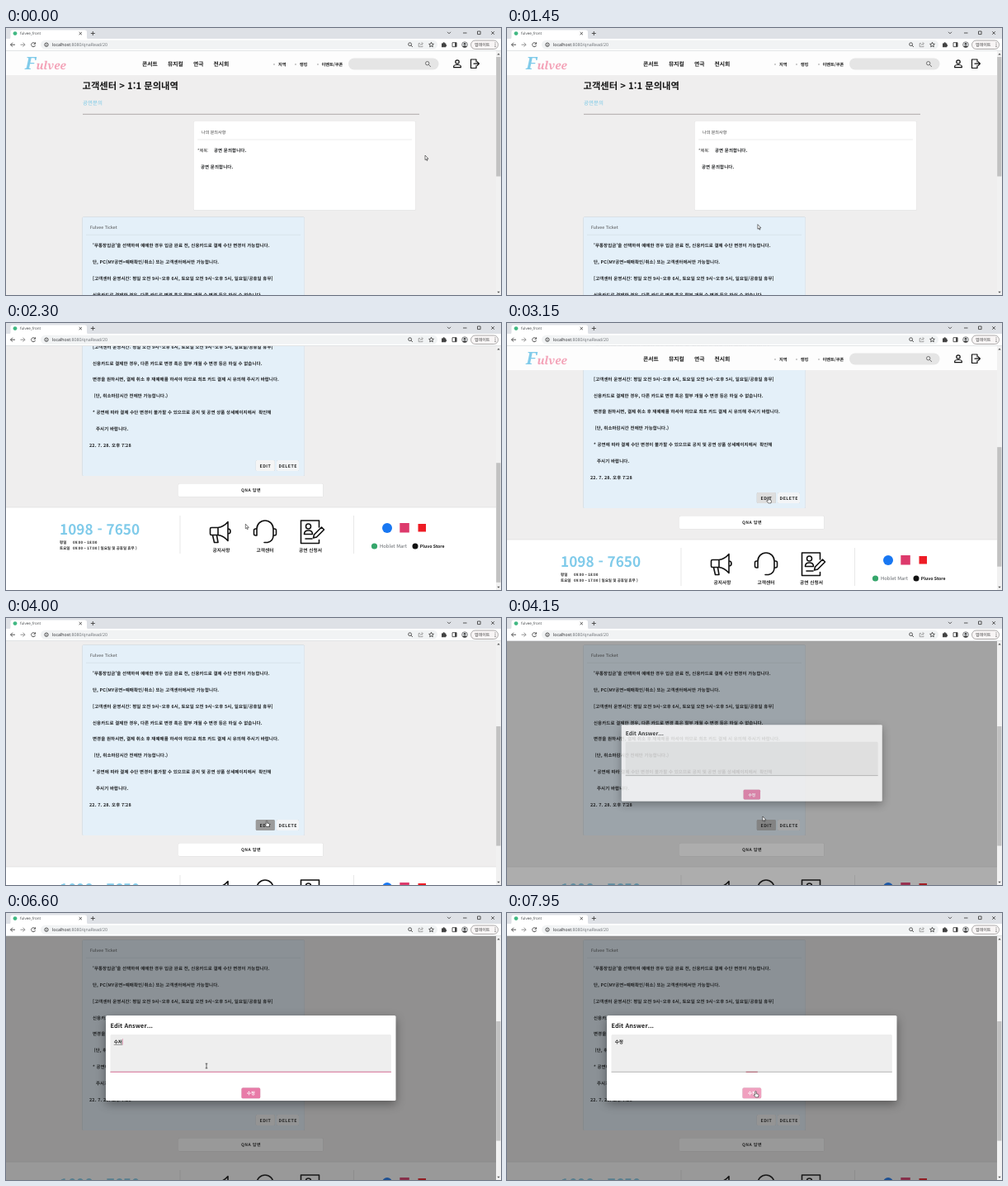
Write an HTML page that moves like this. It is 600 px wide and 323 px high and loops after 8000 ms.

```html
<!DOCTYPE html>
<html lang="ko">
<head>
<meta charset="utf-8">
<title>Q&amp;A</title>
<style>
html, body { margin: 0; width: 100%; height: 100%; overflow: hidden; background: #efeeee; }
svg { display: block; width: 600px; height: 323px; }
text { font-family: "Noto Sans CJK KR", "Noto Sans CJK", sans-serif; white-space: pre; text-rendering: geometricPrecision; }
.ui { font-family: "Open Sans", sans-serif; }
.logo { font: italic 700 13.5px "Noto Serif", serif; }
.b { font-weight: 700; }
.body { font-size: 5.46px; font-weight: 700; letter-spacing: .0179em; fill: #1c1e20; }
.btn { font-weight: 700; letter-spacing: .089em; fill: #222; }
.mid { text-anchor: middle; }
.card { filter: drop-shadow(0 .8px .5px rgba(0,0,0,.25)); }
.pop { filter: drop-shadow(0 4px 6px rgba(0,0,0,.38)); }
.ln { fill: none; stroke: #444; stroke-width: .9; }
.ic { fill: none; stroke: #111; stroke-width: 1.6; stroke-linejoin: round; stroke-linecap: round; }
</style>
</head>
<body>
<svg viewBox="0 0 600 323">
  <defs><clipPath id="view"><path d="M0 27.5H594V323H0z"/></clipPath></defs>
  <rect width="600" height="323" fill="#efeeee"/>

  <g clip-path="url(#view)">
    <g id="page">
      <text class="b" x="92.5" y="74" font-size="11.3" fill="#151515">고객센터 &gt; 1:1 문의내역</text>
      <text x="93" y="93.3" font-size="6.5" fill="#78c8e6">공연문의</text>
      <path d="M93 104.3H501" stroke="#aaa3a3" stroke-width=".9"/>

      <rect class="card" x="227.3" y="113" width="269.3" height="107.5" rx="1.5" fill="#fff"/>
      <text x="237" y="128" font-size="5.05" fill="#333">나의 문의사항</text>
      <path d="M232 135H492" stroke="#e6e6e6" stroke-width=".7"/>
      <text x="232" y="150" font-size="5.2" fill="#222">*제목:</text>
      <text class="body" x="252" y="150">공연 문의합니다.</text>
      <text class="body" x="236" y="170">공연 문의합니다.</text>

      <rect class="card" x="92.5" y="228.5" width="269.3" height="230.5" rx="1.5" fill="#e4f0f9"/>
      <text x="102" y="243.4" font-size="5.1" letter-spacing=".1" fill="#444">Fulvee Ticket</text>
      <path d="M97 250.3H357" stroke="#d3dfe7" stroke-width=".7"/>
      <g id="answer"></g>
      <g class="card"><rect id="edit" x="302.8" y="440" width="23" height="13" rx="1.5"/></g>
      <text class="btn mid" x="314.4" y="448.5" font-size="5.2">EDIT</text>
      <rect class="card" x="328" y="440" width="27" height="13" rx="1.5" fill="#f3f5f7"/>
      <text class="btn mid" x="341.7" y="448.5" font-size="5.2">DELETE</text>
      <rect class="card" x="209" y="468.3" width="175.5" height="16" rx="1.5" fill="#fff"/>
      <text class="btn mid" x="297" y="478.3" font-size="5">QNA 답변</text>

      <g transform="translate(0 235)">
        <rect y="262" width="594" height="110" fill="#fff"/>
        <path d="M0 262H594M211 272V318M421.5 272V318" stroke="#dedede" stroke-width=".7"/>
        <text class="b" x="65" y="294.7" font-size="17.2" fill="#80cbea">1098 - 7650</text>
        <g class="b" font-size="4.5" fill="#222">
          <text x="65" y="306">평일</text><text x="81" y="306">09:00 ~ 18:00</text>
          <text x="65" y="312.8">토요일</text><text x="81" y="312.8">09:00 ~ 17:00 ( 일요일 및 공휴일 휴무 )</text>
        </g>
        <g class="ic">
          <path d="M249 286.5h8q7-1 12-7v23q-5-6-12-7h-8q-1.5 0-1.5-1.5v-6q0-1.5 1.5-1.5zM257 286.5v9M250.5 296l2 8.5h4.5l-1.5-8.5M269 288q3 0 3 3t-3 3"/>
          <path d="M304 293v-5a10 10 0 0 1 20 0v5M304 288h-1.5q-2 0-2 2v4q0 2 2 2h1.5zM324 288h1.5q2 0 2 2v4q0 2-2 2h-1.5zM324 296q0 7-7 8.5h-4"/>
          <path d="M379.5 286v-8h-22v27.5h22v-4M363 300h8M361.5 294.5q0-4.5 5-4.5t5 4.5zM372.5 299l1-4 9-9 3 3-9 9z"/>
          <circle cx="366.5" cy="285" r="3"/>
        </g>
        <g class="b mid" font-size="5.7" fill="#222">
          <text x="261" y="316">공지사항</text><text x="314" y="316">고객센터</text><text x="369" y="316">공연 신청서</text>
        </g>
        <circle cx="462" cy="287" r="6" fill="#1877f2"/>
        <rect x="477.3" y="281" width="11.5" height="11.5" fill="#dd3a6c"/>
        <rect x="499.5" y="282" width="9.5" height="9.5" fill="#ee1c25"/>
        <circle cx="446.5" cy="309" r="3.6" fill="#35a66b"/>
        <text x="453" y="311.3" font-size="5.9" fill="#5f6368">Hoblet Mart</text>
        <circle cx="496" cy="309" r="3.5" fill="#111"/>
        <text class="b" x="501.8" y="311" font-size="5.2" fill="#111">Pluvo Store</text>
      </g>
    </g>

    <g id="header">
      <rect class="card" y="27" width="594" height="30" fill="#fdfdfd"/>
      <text class="logo" x="23" y="50" style="font-size:21px" fill="#80cbea">F</text>
      <text class="logo" x="36.5" y="50" fill="#f4a3b8">ulvee</text>
      <g class="b" font-size="6.8" fill="#1a1a1a">
        <text x="165" y="46">콘서트</text><text x="196" y="46">뮤지컬</text><text x="227" y="46">연극</text><text x="251.5" y="46">전시회</text>
      </g>
      <g class="b" font-size="5.2" fill="#222">
        <text x="330" y="45.5">지역</text><text x="356" y="45.5">랭킹</text><text x="382.5" y="45.5">이벤트/쿠폰</text>
      </g>
      <path d="M325 44h.01M351 44h.01M378 44h.01" stroke="#777" stroke-width="1.3" stroke-linecap="round"/>
      <rect x="415" y="36.5" width="109.5" height="14" rx="7" fill="#e5e5e5"/>
      <g class="ln" style="stroke:#666"><circle cx="510.7" cy="42.7" r="2.2"/><path d="M512.3 44.3l2.6 2.7"/></g>
      <g class="ic" style="stroke-width:1.2">
        <circle cx="547" cy="41" r="2.2"/><path d="M542.7 47.7v-1.2q0-2 4.3-2t4.3 2v1.2z"/>
        <path d="M570 41v-3h-6.5v10.5h6.5v-3M567 43.2h6M571.3 41l2.2 2.2-2.2 2.2"/>
      </g>
    </g>

    <rect id="shade" y="27.5" width="594" height="296" fill="#212121"/>
    <g id="dialog">
      <rect class="pop" x="121" y="124" width="351.5" height="103" rx="1.5" fill="#fff"/>
      <text class="b" x="126.5" y="138.5" font-size="7.3" letter-spacing=".1" fill="#222">Edit Answer...</text>
      <path id="field" d="M126.5 192.5V148.5q0-1.5 1.5-1.5H465.3q1.5 0 1.5 1.5V192.5z"/>
      <path d="M126.5 192.3H466.8" stroke="#8a8a8a" stroke-width=".6"/>
      <rect id="focus" y="191.8" height="1"/>
      <text id="typed" class="b" x="130.7" y="157.6" font-size="5.6" fill="#222"></text>
      <rect id="under" x="130.7" y="158.9" height=".5" fill="#333"/>
      <rect id="caret" y="152" width=".6" height="7.5"/>
      <g class="card"><rect id="send" x="285.5" y="211.5" width="22.7" height="12.8" rx="1.5"/></g>
      <text class="b mid" x="296.9" y="220" font-size="5.3" fill="#fff">수정</text>
    </g>
  </g>

  <g id="bar">
    <rect x="594" y="27.5" width="6" height="296" fill="#f1f1f1"/>
    <path d="M595.3 32.5l1.7-2 1.7 2zM595.3 318.7l1.7 2 1.7-2z" fill="#555"/>
    <rect id="thumb" x="594.2" width="5.2" height="144.5" fill="#c1c1c1"/>
  </g>

  <g id="chrome">
    <rect width="600" height="13.5" fill="#dee1e6"/>
    <path d="M3 13.5q2.5 0 2.5-2.5V5q0-2.5 2.5-2.5H95.5q2.5 0 2.5 2.5v6q0 2.5 2.5 2.5z" fill="#fff"/>
    <circle cx="11" cy="6.6" r="2.4" fill="#41b883"/>
    <text class="ui" x="17" y="8.3" font-size="4.5" fill="#3c4043">fulvee_front</text>
    <rect y="13" width="600" height="14.5" fill="#fff"/>
    <rect x="42" y="14.7" width="481" height="11" rx="5.5" fill="#f1f3f4"/>
    <path d="M0 27.5H600" stroke="#d9dbdf" stroke-width=".7"/>
    <g class="ln">
      <path d="M88.7 5l3.2 3.2M91.9 5l-3.2 3.2M102.8 6.5h5M105.3 4v5"/>
      <path d="M535 4.8l2 2 2-2M554 6h4.5M571.5 4h3.6v3.6h-3.6zM588.3 4.2l3.6 3.6M591.9 4.2l-3.6 3.6"/>
      <path d="M11 20.2H5.5M8 17.7l-2.5 2.5 2.5 2.5"/>
      <path d="M17.5 20.2H23M20.5 17.7l2.5 2.5-2.5 2.5" style="stroke:#888"/>
      <path d="M35.2 18.8a2.5 2.5 0 1 0 .3 2.2M35.6 17.3v2h-2"/>
      <circle cx="49" cy="20.2" r="2.2"/><path d="M49 19.8v1.6M49 18.7v.4"/>
      <circle cx="489.6" cy="19.7" r="1.9"/><path d="M491 21.1l1.9 1.9"/>
      <path d="M502 18.5h-1.8v4.2h4.8v-1M502 21q.3-2 3-2M503.7 17.2l1.8 1.8-1.8 1.8" style="stroke:#999"/>
      <path d="M515.5 17.3l.85 1.9 2.05.2-1.55 1.4.45 2-1.8-1.05-1.8 1.05.45-2-1.55-1.4 2.05-.2z"/>
      <path d="M541 17.7h5v5h-5z"/>
    </g>
    <path d="M528 18.5h1.5a1.2 1.2 0 0 1 2.4 0h1.4v1.5a1.2 1.2 0 0 1 0 2.3v1h-5.3z" fill="#444"/>
    <path d="M544 17.7h2.2v5h-2.2z" fill="#444"/>
    <circle cx="556" cy="20.2" r="3.4" fill="#e4e7ea" stroke="#555" stroke-width=".7"/>
    <path d="M553.3 22.6q2.7-2.6 5.4 0-2.7 2-5.4 0z" fill="#444"/><circle cx="556" cy="19.2" r="1.3" fill="#444"/>
    <rect x="563.5" y="15" width="33" height="10.5" rx="5.2" fill="#f8f5f5" stroke="#8c8888" stroke-width=".7"/>
    <text x="568" y="22" font-size="5" fill="#333">업데이트</text>
    <path d="M593 18h.01M593 20.2h.01M593 22.4h.01" stroke="#444" stroke-width="1.1" stroke-linecap="round"/>
    <text class="ui" x="56" y="22.1" font-size="5.25" fill="#6a6e73"><tspan fill="#202124">localhost</tspan>:8080/qnaRead/20</text>
  </g>

  <g id="pointer" stroke-linejoin="round">
    <path id="arrow" d="M0 0v5.6l1.3-1.1.8 2 .9-.4-.8-1.9h1.8z" fill="#fff" stroke="#222" stroke-width=".6"/>
    <path id="hand" d="M-.7.5q.7-1 1.4 0v2.7l2.2.6q.7.3.6 1l-.5 2.6h-3.2l-2.1-2.6q0-.8.9-.6l.7.6z" fill="#fff" stroke="#222" stroke-width=".6"/>
    <path id="beam" d="M-1.3-2.8H1.3M0-2.8V2.8M-1.3 2.8H1.3" fill="none" stroke="#222" stroke-width=".7"/>
  </g>
</svg>

<script>
const LOOP = 8000;
const el = id => document.getElementById(id);
const set = (id, attrs) => { for (const k in attrs) el(id).setAttribute(k, attrs[k]); };
const clamp = v => Math.max(0, Math.min(1, v));
const ramp = (t, start, length) => clamp((t - start) / length);
const smooth = p => p * p * (3 - 2 * p);
const easeOut = p => 1 - (1 - p) ** 3;
const mix = (a, b, p) => a + (b - a) * p;
const grey = v => `rgb(${v},${v},${v})`;

const lines = [
  [105, "'무통장입금'을 선택하여 예매한 경우 입금 완료 전, 신용카드로 결제 수단 변경이 가능합니다."],
  [105, "단, PC(MY공연>예매확인/취소) 또는 고객센터에서만 가능합니다."],
  [105, "[고객센터 운영시간: 평일 오전 9시~오후 6시, 토요일 오전 9시~오후 5시, 일요일/공휴일 휴무]"],
  [105, "신용카드로 결제한 경우, 다른 카드로 변경 혹은 할부 개월 수 변경 등은 하실 수 없습니다."],
  [105, "변경을 원하시면, 결제 취소 후 재예매를 하셔야 하므로 최초 카드 결제 시 유의해 주시기 바랍니다."],
  [106.5, "(단, 취소마감시간 전에만 가능합니다.)"],
  [105, "* 공연에 따라 결제 수단 변경이 불가할 수 있으므로 공지 및 공연 상품 상세페이지에서  확인해"],
  [109, "주시기 바랍니다."],
  [101, "22. 7. 28. 오후 7:28"]
];
lines.forEach(([x, s], i) => {
  const node = document.createElementNS("http://www.w3.org/2000/svg", "text");
  node.setAttribute("class", "body");
  node.setAttribute("x", x);
  node.setAttribute("y", 265.2 + 19.82 * i);
  node.textContent = s;
  el("answer").append(node);
});

// Each key is [time, ...values].
const scrollKeys = [[1600, 0], [1860, 113], [1900, 125], [2250, 274], [2750, 274], [2900, 235], [3200, 235], [3350, 196]];
const mouseKeys = [[900, 508, 154], [1550, 290.3, 243.2], [2450, 290.3, 243.2], [2980, 317, 210.5],
  [3200, 317, 210.5], [3380, 316, 245], [4080, 316, 245], [4480, 243, 185], [7100, 243, 185], [7600, 301.5, 215.5]];
const typing = [[0, ""], [6250, "ㅅ"], [6390, "수"], [6490, "숮"], [6580, "수저"], [6740, "수정"]];
const OPEN = 4060, FOCUS = 4645, BLUR = 7755;

function track(keys, t, ease = p => p) {
  const i = keys.findIndex(k => k[0] > t);
  if (i === 0) return keys[0].slice(1);
  if (i < 0) return keys[keys.length - 1].slice(1);
  const [a, b] = [keys[i - 1], keys[i]];
  const p = ease((t - a[0]) / (b[0] - a[0]));
  return a.slice(1).map((v, j) => mix(v, b[j + 1], p));
}

function draw(t) {
  const [scroll] = track(scrollKeys, t);
  const [mx, my] = track(mouseKeys, t, smooth);
  const over = (x, y, w, h) => mx >= x && mx <= x + w && my >= y && my <= y + h;

  set("page", { transform: `translate(0 ${-scroll})` });
  set("thumb", { y: 35 + scroll * .49 });
  const hidden = smooth(ramp(t, 1600, 200)) - smooth(ramp(t, 2770, 200)) + smooth(ramp(t, 3190, 180));
  set("header", { transform: `translate(0 ${-34 * hidden})` });

  const open = t >= OPEN;
  const onEdit = !open && over(302.8, 440 - scroll, 23, 13);
  const press = open ? 1 - ramp(t, OPEN, 250) : ramp(t, 3880, 100);
  set("edit", { fill: grey(Math.round(mix(onEdit ? 222 : 245, 155, press))) });

  const shown = easeOut(ramp(t, OPEN, 220));
  const size = mix(.5, 1, shown);
  set("shade", { opacity: .46 * shown });
  set("dialog", {
    opacity: shown,
    transform: `translate(296.7 175.5) scale(${size}) translate(-296.7 -175.5)`
  });

  const focused = t >= FOCUS && t < BLUR;
  const onField = open && over(126.5, 147, 340, 45.5);
  const onSend = open && over(285.5, 211.5, 22.7, 12.8);
  const dark = onField ? 1 - easeOut(ramp(t, FOCUS, 300)) : 0;
  set("field", { fill: grey(Math.round(mix(238, 221, dark))) });

  const width = 340.3 * (easeOut(ramp(t, FOCUS + 10, 300)) - easeOut(ramp(t, BLUR, 300)));
  set("focus", { x: 296.7 - width / 2, width, fill: t < BLUR ? "#e580a6" : "#b05a6c" });

  const text = typing.filter(k => k[0] <= t).pop()[1];
  const textWidth = text.length * 5.2;
  const composing = text && t < BLUR;
  el("typed").textContent = text;
  set("under", { width: composing ? textWidth : 0 });
  const lastKey = text ? Math.min(t, 6740) : FOCUS;
  const blink = Math.floor((t - lastKey) / 500) % 2 === 0;
  set("caret", {
    x: 130.9 + textWidth,
    fill: "#e580a6",
    opacity: focused && blink ? mix(.25, 1, ramp(t, FOCUS, 100)) : 0
  });
  set("send", { fill: onSend ? "#f0a0bf" : "#e87ba8" });

  const shape = onEdit || onSend ? "hand" : onField ? "beam" : "arrow";
  set("pointer", { transform: `translate(${mx} ${my})` });
  for (const id of ["arrow", "hand", "beam"]) set(id, { visibility: id === shape ? "visible" : "hidden" });
}

const start = performance.now();
function loop() {
  draw((performance.now() - start) % LOOP);
  requestAnimationFrame(loop);
}
draw(0);
loop();
</script>
</body>
</html>
```
